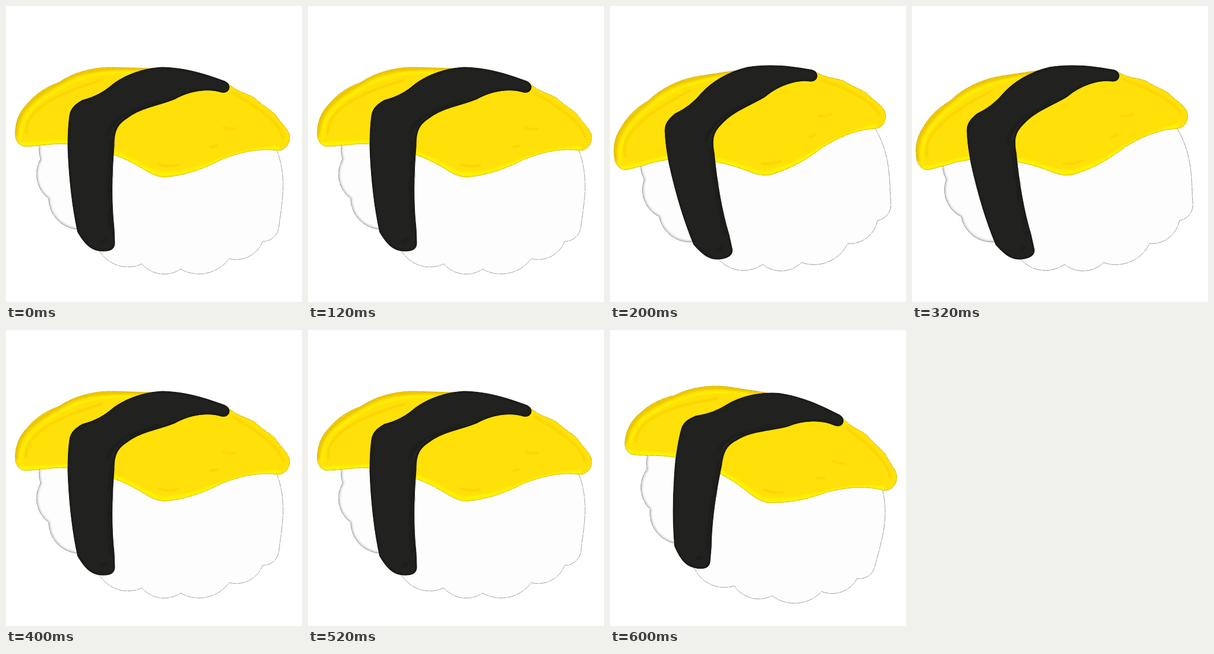
An HTML page that plays this animation: 512 by 512 pixels, repeating every 800 ms.

```html
<!DOCTYPE html>
<html lang="en">
<head>
<meta charset="utf-8">
<title>Rocking sushi</title>
<style>
  html, body { margin: 0; width: 100%; height: 100%; overflow: hidden; background: #fff; }
  svg { display: block; width: 100vw; height: 100vh; }
  path, use { fill: none; stroke-linecap: round; stroke-linejoin: round; }
  .soft { filter: url(#blur); }
</style>
</head>
<body>
<svg viewBox="0 0 512 512">
  <defs>
    <filter id="blur" x="-20%" y="-20%" width="140%" height="140%"><feGaussianBlur stdDeviation="1.6"/></filter>
    <path id="rice" style="fill:inherit"/>
    <path id="egg" style="fill:inherit" d="M35 243C22 243 15 232 16 218C17 200 22 184 38 168C52 151 70 140 92 132
      C112 118 145 106 182 106L250 108C300 108 345 116 384 134C400 149 415 150 430 159
      C446 174 458 179 466 188C476 203 486 210 490 222C493 237 484 250 470 250
      C440 246 410 251 372 266C345 280 315 292 276 296C248 296 240 277 186 257L107 239C85 237 65 241 50 242Z"/>
    <path id="nori" style="fill:inherit" d="M386 139C387 147 380 151 372 149C350 142 318 146 292 161
      C262 173 232 176 208 195C190 207 187 220 187 242C183 290 182 340 187 385L188 410
      C188 421 180 424 168 424C148 424 137 413 124 391C115 350 109 300 107 245C107 220 108 205 110 190
      C112 175 122 169 132 163C155 157 170 148 184 136C205 120 235 108 270 106C315 107 350 120 378 130Q385 133 386 139Z"/>
    <clipPath id="inRice"><use href="#rice"/></clipPath>
    <clipPath id="inEgg"><use href="#egg"/></clipPath>
    <clipPath id="inNori"><use href="#nori"/></clipPath>
  </defs>
  <g id="sushi">
    <use href="#rice" style="fill:#fdfdfd"/>
    <g clip-path="url(#inRice)">
      <path id="fold" class="soft" stroke="#d0d0d0" stroke-width="5"/>
      <path d="M184 284L186 297" stroke="#ddd" stroke-width="2"/>
    </g>
    <use href="#rice" stroke="#858585" stroke-width=".8" stroke-dasharray="4 1 2 2 6 1"/>

    <use href="#egg" style="fill:#ffe008"/>
    <g clip-path="url(#inEgg)">
      <path class="soft" d="M25 239L107 235M186 253C240 273 248 291 276 291C345 287 372 254 470 245" stroke="#fff200" stroke-width="7"/>
      <path class="soft" d="M17 222C18 182 46 158 92 133C128 110 160 106 250 108" stroke="#ecc600" stroke-width="7"/>
      <path class="soft" d="M25 229C26 188 52 165 98 140C133 120 165 115 214 115" stroke="#fff000" stroke-width="4"/>
      <path class="soft" d="M35 220C31 180 90 150 166 128M392 150Q472 195 479 227" stroke="#f8d000" stroke-width="3"/>
      <path class="soft" d="M376 210Q384 215 398 212M354 244L366 241M264 274Q280 280 299 275" stroke="#f4cc00" stroke-width="2"/>
    </g>
    <use href="#egg" stroke="#c5aa00" stroke-width=".8" stroke-dasharray="3 1 5 2"/>

    <use href="#nori" style="fill:#21211f" stroke="#21211f"/>
    <g clip-path="url(#inNori)">
      <use href="#nori" class="soft" stroke="#141413" stroke-width="3"/>
      <path class="soft" d="M176 222Q182 190 265 164M181 235Q176 310 180 385M163 409L174 403" stroke="#151514" stroke-width="2"/>
      <path d="M184 219Q193 196 213 187" stroke="#30302d" stroke-dasharray="5 2"/>
    </g>
  </g>
</svg>
<script>
  const STEP = 200;
  const CENTER = "254 286";
  const POSES = [0, -10.3, 0, 7.2];
  const byId = id => document.getElementById(id);

  // A row of bulges between cusps; each radius follows from its chord.
  function scallops(cusps) {
    return cusps.map(([x, y], i) => {
      if (i === 0) return `${x} ${y}`;
      const [px, py] = cusps[i - 1];
      const r = 0.75 * Math.hypot(x - px, y - py);
      return `A${r} ${r} 0 0 0 ${x} ${y}`;
    }).join("");
  }

  const side = "M58 236Q56 255 " + scallops([[60, 265], [74, 333], [122, 386]]);
  const base = scallops([[162, 424], [235, 446], [302, 455], [386, 437], [444, 407], [472, 383]]);
  byId("fold").setAttribute("d", side);
  byId("rice").setAttribute("d", `${side}L${base}C476 345 488 300 468 248L270 180Z`);

  const sushi = byId("sushi");
  const start = performance.now();

  function draw(now) {
    const pose = Math.floor(Math.max(0, now - start) / STEP) % POSES.length;
    sushi.setAttribute("transform", `rotate(${POSES[pose]} ${CENTER})`);
    requestAnimationFrame(draw);
  }
  draw(start);
</script>
</body>
</html>
```
